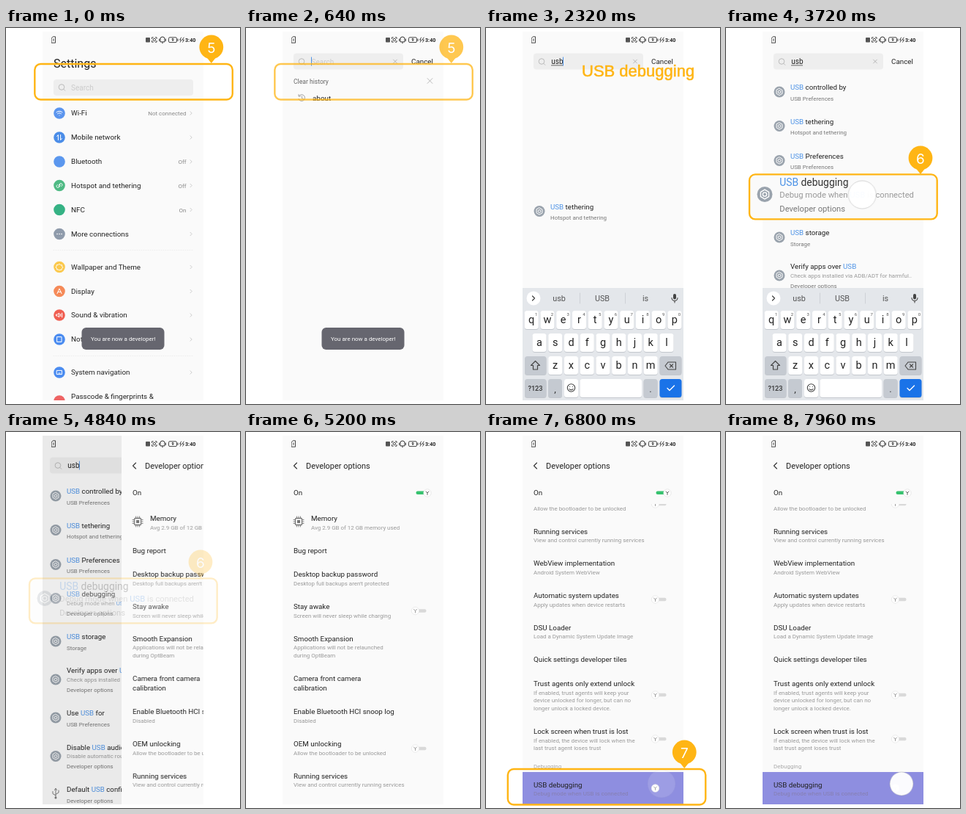
An HTML page for the animation above (8000 ms loop, 320 by 512 pixels).

```html
<!DOCTYPE html>
<html lang="en">
<head>
<meta charset="utf-8">
<title>Turn on USB debugging</title>
<style>
html, body { margin: 0; width: 100%; height: 100%; overflow: hidden; background: #fff; }
svg { display: block; width: 320px; height: 512px; font-family: Roboto, "Noto Sans", sans-serif; }
text { white-space: pre; }
.line { fill: none; stroke-linecap: round; stroke-linejoin: round; }
</style>
</head>
<body>
<svg id="stage" viewBox="0 0 320 512"></svg>
<script>
const LOOP = 8000;
const INK = '#222', GREY = '#999', BLUE = '#4c92e6', GOLD = '#ffb514';
const SLIDE = 'cubic-bezier(.2,.3,.4,1)';
let css = '';

// Adds a looping animation for the class `name` from [ms, value] pairs.
function anim(name, prop, points, ease = 'linear') {
  const steps = points.map(([ms, v]) => `${(ms / LOOP * 100).toFixed(4)}%{${prop}:${v}}`).join('');
  const last = points[points.length - 1][1];
  css += `@keyframes ${name}{${steps}100%{${prop}:${last}}}` +
    `.${name}{animation:${name} ${LOOP}ms ${ease} infinite}`;
}
// Fades in over inA..inB and out over outA..outB; equal times make a cut.
function fade(name, inA, inB, outA, outB) {
  const p = inB > 0 ? [[0, 0], [inA - .1, 0], [inB, 1]] : [[0, 1]];
  if (outA) p.push([outA, 1], [outB === outA ? outB + .1 : outB, 0]);
  anim(name, 'opacity', p);
}
const shiftX = v => `translateX(${v}px)`;
const shiftY = v => `translateY(${v}px)`;

// y is the middle of the capital letters
const text = (x, y, size, str, fill = INK, more = '') =>
  `<text x="${x}" y="${y + size * .355}" font-size="${size}" fill="${fill}" ${more}>${str}</text>`;
const mid = 'text-anchor="middle"';
const rect = (x, y, w, h, fill, r = 0, more = '') =>
  `<rect x="${x}" y="${y}" width="${w}" height="${h}" rx="${r}" fill="${fill}" ${more}/>`;
const disc = (x, y, r, fill, more = '') => `<circle cx="${x}" cy="${y}" r="${r}" fill="${fill}" ${more}/>`;
const line = (d, stroke = '#333', w = 1, more = '') =>
  `<path class="line" d="${d}" stroke="${stroke}" stroke-width="${w}" ${more}/>`;
const group = (name, body) => `<g class="${name}">${body}</g>`;
const at = (x, y, body) => `<g transform="translate(${x} ${y})">${body}</g>`;
const tint = s => s.replace('USB', `<tspan fill="${BLUE}">USB</tspan>`);
const cross = (x, y, r) => line(`M${x - r} ${y - r}l${2 * r} ${2 * r}m0 ${-2 * r}l${-2 * r} ${2 * r}`, '#aaa', .8);
const page = fill => rect(50, 5, 220, 502, fill);

function magnifier(y) {
  return disc(76, y - .5, 3.8, 'none', 'stroke="#b5b5b5" stroke-width=".9"') +
    line(`M79 ${y + 2.5}l1.8 1.8`, '#b5b5b5', .9);
}

function statusBar() {
  return line('M62.5 13.5l1.8-1.7h3.2v8.4h-5z', '#333', .9) + line('M65 15v2.3', '#333', 1) +
    rect(191, 13, 6, 6.5, '#555', 1) +
    line('M199.5 14.5v-1.7h1.8m3 0h1.8v1.7m0 3v1.7h-1.8m-3 0h-1.8v-1.7', '#333', .9) +
    disc(202.8, 16, 1.7, 'none', 'stroke="#333" stroke-width=".9"') +
    line('M211 18.5v-3.5a3 3 0 0 1 6 0v3.5zm2.4 1.7h1.2M209.7 15v2.5m8.6-2.5v2.5', '#333', 1) +
    rect(222.5, 12.8, 11, 6.8, 'none', 1.5, 'stroke="#333" stroke-width=".9"') +
    line('M235 15v2.5') + text(228, 16.2, 5.5, '9', '#222', mid + ' font-weight="700"') +
    line('M239.6 13l-2 3.2h2.3l-1.7 3m4.9-6.2l-2 3.2h2.3l-1.7 3', '#333', .9) +
    text(245, 16.2, 7.2, '3:40', '#222', 'font-weight="700"');
}

// ---- Settings page ----
const GLYPHS = {
  wifi: 'M-4-1.2a5.6 5.6 0 0 1 8 0M-2.6.8a3.6 3.6 0 0 1 5.2 0M0 3v.1',
  data: 'M-1.6 3.5v-7l-1.8 2M1.6-3.5v7l1.8-2',
  link: 'M-.5 1.5a2 2 0 0 1 0-2.6l1.6-1.5a1.9 1.9 0 0 1 2.6 2.6l-1 1M.5-1.5a2 2 0 0 1 0 2.6l-1.6 1.5a1.9 1.9 0 0 1-2.6-2.6l1-1',
  dots: 'M-3 0h.1M0 0h.1M3 0h.1',
  flower: 'M0-4l1.5 1.2 2 .1.2 2 1.1 1.4-1.5 1.3-.4 1.8-2 .1L0 4.5l-1.3-.9-2-.1-.3-1.8-1.4-1.2 1-1.5.3-1.8 2-.2z',
  letter: 'M-3 3.2L0-3.6 3 3.2M-1.8 1h3.6',
  sound: 'M-4-1h1.6l2-2v6l-2-2H-4zM1.6-1.6v3.2M3.6-2.8v5.6',
  frame: 'M-3-3.4h6v6.8h-6z',
  nav: 'M-3.4-2.6h6.8v5.2h-6.8zM-1.2 1h2.4'
};
const SETTINGS = [
  [116, 'Wi-Fi', '#5b95ee', 'wifi', 'Not connected'],
  [149, 'Mobile network', '#4b8de8', 'data', ''],
  [182, 'Bluetooth', '#5b97ee', '', 'Off'],
  [214.5, 'Hotspot and tethering', '#4fba84', 'link', 'Off'],
  [247.5, 'NFC', '#35b284', '', 'On'],
  [280.5, 'More connections', '#8f9bab', 'dots', ''],
  [325.5, 'Wallpaper and Theme', '#fbc94e', 'flower', ''],
  [358.5, 'Display', '#f58a58', 'letter', ''],
  [391, 'Sound &amp; vibration', '#f05f52', 'sound', ''],
  [424, 'Notification center', '#4b8cf0', 'frame', ''],
  [469, 'System navigation', '#4b8cf0', 'nav', '']
];
function settingsPage() {
  const rows = SETTINGS.map(([y, name, color, glyph, value]) =>
    disc(73, y, 7.8, color) +
    (glyph ? at(73, y, line(GLYPHS[glyph], '#fff', glyph === 'dots' ? 1.6 : 1)) : '') +
    text(89, y, 9.85, name) +
    text(246.5, y + .3, 8, value, '#888', 'text-anchor="end"') +
    line(`M252 ${y - 2.2}l2.2 2.2-2.2 2.2`, '#c0c0c0', .8)).join('');
  const rule = y => line(`M65 ${y}H256`, '#e9e9e9', .7, 'stroke-dasharray="1 2"');
  return page('#fafafa') + text(65, 48, 16, 'Settings') +
    rect(65, 70, 191, 22, '#eee', 4) + magnifier(81) + text(89, 81.3, 10, 'Search', '#ccc') +
    rows + rule(302.5) + rule(446.5) +
    text(89, 502, 9.85, 'Passcode &amp; fingerprints &amp;') + disc(73, 508, 7.8, '#ee6464');
}

// ---- Search page ----
const gear = (x, y, k = 1) => `<g transform="translate(${x} ${y}) scale(${k})">` +
  disc(0, 0, 7.5, '#9aa3ad') + line('M0-4.6l4 2.3v4.6l-4 2.3-4-2.3v-4.6z', '#fff', 1) +
  disc(0, 0, 1.9, 'none', 'stroke="#fff" stroke-width="1"') + '</g>';
const trident = line('M73 485.5v12m0-12l-1.5 2m1.5-2l1.5 2M73 495l-4-2.5v-3M73 493.5l4-2.5v-3', '#777') +
  disc(73, 498, 1.5, '#777');
function result(y, title, subs, icon) {
  const three = subs.length > 1;
  return (icon || gear(73, y + (three ? (title[0] === 'U' ? 5.5 : 12) : 6))) +
    text(88, y, 9.75, tint(title)) +
    subs.map((s, i) => three && !i
      ? text(88, y + 12, 7.95, tint(s), GREY)
      : text(88, y + (three ? 26 : 15), 7.95, s, '#777')).join('');
}
const DEV = 'Developer options', PREF = 'USB Preferences';
const RESULTS = [
  [81, 'USB controlled by', [PREF]],
  [174.5, PREF, [PREF]],
  [221, 'USB debugging', ['Debug mode when USB is connected', DEV]],
  [279, 'USB storage', ['Storage']],
  [325, 'Verify apps over USB', ['Check apps installed via ADB/ADT for harmful..', DEV]],
  [383, 'Use USB for', [PREF]],
  [429.5, 'Disable USB audio routing', ['Disable automatic routing to USB audio', DEV]],
  [487, 'Default USB configuration', [DEV], trident]
];
const caret = x => group('caret', rect(x, 39.5, 1, 12, BLUE));
const typed = (name, str, end, more = '') => group(name, text(89.3, 45.5, 10, str) + caret(end) + more);
function searchPage() {
  return page('#fafafa') +
    group('results', RESULTS.map(r => result(...r)).join('')) +
    group('tether', group('tetherIn', result(127.5, 'USB tethering', ['Hotspot and tethering']))) +
    rect(65, 34.5, 150, 22, '#eee', 4) + magnifier(46) + cross(204, 45.5, 2.4) +
    text(226, 46, 9.85, 'Cancel') +
    group('history', text(89.5, 46, 10, 'Search', '#ccc') + caret(89) +
      text(65, 72.5, 8.6, 'Clear history', '#666') + cross(251.5, 72, 3.4) +
      line('M72.5 92.5a4.4 4.4 0 1 1-.6 4M72 90.5v2.5h2.5M76.5 93v2.8l2 1', '#999', .9) +
      text(91, 95.5, 9.85, 'about')) +
    typed('typeU', 'u', 95) + typed('typeUs', 'us', 100) +
    typed('typeUsb', 'usb', 105, group('underline', rect(89, 50.5, 16, .8, '#444')));
}

// ---- Keyboard ----
function keyboard() {
  const cap = (x, y, w, fill = '#fff') => rect(x, y + 1, w, 25, '#c3c7cd', 3.5) + rect(x, y, w, 25, fill, 3.5);
  const letters = (str, x, y) => [...str].map((c, i) => {
    const cx = x + i * 21.75;
    return cap(cx - 9.5, y, 19) + text(cx, y + 11.7, 14.5, c, INK, mid) +
      (y < 400 ? text(cx + 6.5, y + 4.5, 6, (i + 1) % 10, '#555', mid) : '');
  }).join('');
  const dark = '#c5cad1';
  return rect(50, 354, 220, 153, '#e4e7eb') + disc(65, 368, 9.5, '#fff') +
    line('M63.5 365l3 3-3 3', '#444', 1.3) +
    group('hints', text(100, 368.5, 10.8, 'usb', '#555', mid) + text(159, 368.5, 10.8, 'USB', '#555', mid) +
      text(218, 368.5, 10.8, 'is', '#555', mid) + line('M128.5 361v14M190.5 361v14', '#c8ccd1', .8)) +
    rect(256, 362, 4, 7.5, '#444', 2) + line('M254 367.5a4 4 0 0 0 8 0M258 371.5v2.5', '#444', 1.1) +
    letters('qwertyuiop', 62.2, 385) + letters('asdfghjkl', 73, 416) + letters('zxcvbnm', 94.7, 447) +
    cap(53, 447, 29.5, dark) + line('M67.5 453.5l6 6h-3v5.5h-6v-5.5h-3z', '#444', 1.2) +
    cap(237.5, 447, 30, dark) + line('M249 455h10.5v10H249l-4-5zm2.5 3l4 4m0-4l-4 4', '#444', 1.1) +
    cap(53, 478, 29.5, dark) + text(67.5, 490.5, 9.2, '?123', '#333', mid + ' font-weight="500"') +
    cap(85, 478, 19, dark) + text(94.5, 491, 13, ',', '#333', mid) +
    cap(107, 478, 19) + disc(116.5, 490, 5.2, 'none', 'stroke="#444" stroke-width="1.1"') +
    line('M114.5 488.5h.1m3.8 0h.1M114 491.5a3 3 0 0 0 5 0', '#444', 1.1) +
    cap(128.5, 478, 84.5) + cap(215.5, 478, 19, dark) + text(225, 491, 13, '.', '#333', mid) +
    cap(237.5, 478, 30, '#1a73e8') + line('M248 490.5l3 3 6.5-6.5', '#fff', 1.4);
}

// ---- Developer options page ----
const knob = (x, y, mark = '#999') => disc(x, y, 5.2, '#fff', 'stroke="#e2e2e2" stroke-width=".7"') +
  line(`M${x - 2} ${y - 2}l2 2 2-2m-2 2v2.5`, mark, 1);
const toggle = y => rect(233, y - 2.2, 13.5, 4.4, '#d9d9d9', 2) + knob(231.5, y);
const OPTIONS = [
  [118, 'Memory', ['Avg 2.9 GB of 12 GB memory used'], 0, 89],
  [161.5, 'Bug report', []],
  [194, 'Desktop backup password', ['Desktop full backups aren\'t protected']],
  [238, 'Stay awake', ['Screen will never sleep while charging'], 243.5],
  [281.5, 'Smooth Expansion', ['Applications will not be relaunched', 'during OptBeam']],
  [381, 'Enable Bluetooth HCI snoop log', ['Disabled']],
  [425, 'OEM unlocking', ['Allow the bootloader to be unlocked'], 431],
  [468.5, 'Running services', ['View and control currently running services']],
  [512, 'WebView implementation', ['Android System WebView']],
  [556, 'Automatic system updates', ['Apply updates when device restarts'], 561],
  [599.5, 'DSU Loader', ['Load a Dynamic System Update Image']],
  [643, 'Quick settings developer tiles', []],
  [676, 'Trust agents only extend unlock',
    ['If enabled, trust agents will keep your', 'device unlocked for longer, but can no', 'longer unlock a locked device.'], 691],
  [741, 'Lock screen when trust is lost',
    ['If enabled, the device will lock when the', 'last trust agent loses trust'], 751]
];
function devPage() {
  const rows = OPTIONS.map(([y, title, subs, sw, x = 65]) =>
    text(x, y, 9.8, title) +
    subs.map((s, i) => text(x, y + 12 + i * 10.5, 7.95, s, GREY)).join('') +
    (sw ? toggle(sw) : '')).join('');
  const pins = [0, 90, 180, 270].map(a =>
    `<g transform="rotate(${a})">${line('M-2.5-5v-2M0-5v-2M2.5-5v-2', '#777', .9)}</g>`).join('');
  const chip = at(72, 122, rect(-4.5, -4.5, 9, 9, 'none', 1, 'stroke="#777" stroke-width="1.3"') +
    rect(-2, -2, 4, 4, '#777') + pins);
  const list = chip + rows + text(65, 335.5, 9.8, 'Camera front camera') + text(65, 349, 9.8, 'calibration') +
    text(65, 788, 8, 'Debugging', '#aaa') +
    rect(50, 796, 220, 44, '#fafafa', 0, 'class="glow"') + text(65, 813.5, 9.8, 'USB debugging') +
    text(65, 825.5, 7.95, 'Debug mode when USB is connected', GREY, 'class="dimText"') + knob(231.5, 818);
  return page('#fafafa') + `<g clip-path="url(#list)">${group('scroll', list)}</g>` +
    line('M69.5 42l-4 4 4 4', '#333', 1.1) + text(82, 46, 10.95, DEV) + text(65, 83, 9.8, 'On') +
    rect(232.5, 80.5, 14, 4.6, '#36c26e', 2.3) + knob(248, 83, '#666');
}

// ---- Overlays ----
const pin = (x, y, n) => disc(x, y, 16.4, GOLD) +
  `<path d="M${x - 6} ${y + 14.5}h12l-6 7.5z" fill="${GOLD}"/>` +
  text(x, y + .8, 19, n, '#fff', mid + ' font-family="Inter, Lato, sans-serif"');
const box = (x, y, w, h, fill = 'none') => rect(x, y, w, h, fill, 8, `stroke="${GOLD}" stroke-width="2.4"`);
const wide = (x, y, n) => box(x, y, 270.5, 48.5) + pin(x + 241.5, y - 23, n);
const zoomed = box(32, 199.4, 256.7, 61, '#fafafa') + pin(266, 177, 6) + gear(53, 226.5, 1.4) +
  text(73.3, 210.2, 13.85, tint('USB debugging'), '#333') +
  text(73.3, 227.2, 11.25, tint('Debug mode when USB is connected'), GREY) + text(73.3, 246.2, 11.2, DEV, '#777');
const tap = (n, x, y) => at(x, y, group('tap' + n, group('pulse' + n,
  disc(0, 0, 19, '#fff', 'fill-opacity=".97" stroke="#aaa" stroke-width=".6" stroke-opacity=".8"'))));

// ---- Timing ----
anim('settings', 'transform', [[0, shiftX(0)], [280, shiftX(0)], [620, shiftX(-10)]], SLIDE);
anim('search', 'transform', [[0, shiftX(220)], [280, shiftX(220)], [620, shiftX(0)], [4700, shiftX(0)], [5200, shiftX(-10)]], SLIDE);
anim('dev', 'transform', [[0, shiftX(220)], [4700, shiftX(220)], [5200, shiftX(0)]], SLIDE);
anim('shadeA', 'opacity', [[0, 0], [280, 0], [620, .12]], SLIDE);
anim('shadeB', 'opacity', [[0, 0], [4700, 0], [5200, .12]], SLIDE);
anim('keys', 'transform', [[0, shiftY(160)], [640, shiftY(160)], [760, shiftY(0)], [4560, shiftY(0)], [4700, shiftY(160)]], 'ease-out');
anim('tether', 'transform', [[0, shiftY(116)], [2320, shiftY(116)], [2560, shiftY(0)]], 'ease-in-out');
anim('scroll', 'transform', [[0, shiftY(0)], [5340, shiftY(0)], [5540, shiftY(-333)]], 'ease-out');
anim('glow', 'fill', [[0, '#fafafa'], [5540, '#fafafa'], [5640, '#d6d6e2'], [5800, '#8e8ee0']]);
anim('dimText', 'fill', [[0, GREY], [5640, GREY], [5800, '#867fb0']]);
anim('caret', 'opacity', [[0, 1], [919.9, 1], [920, 0], [1079.9, 0], [1080, 1], [2700, 1], [2700.1, 0], [4559.9, 0], [4560, 1]]);
fade('history', 0, 0, 1080, 1080);
fade('typeU', 1080, 1080, 1640, 1640);
fade('typeUs', 1640, 1640, 2160, 2160);
fade('typeUsb', 2160, 2160);
fade('underline', 2160, 2160, 4560, 4560);
fade('hints', 2160, 2160);
fade('tetherIn', 2200, 2280);
fade('results', 2560, 2700);
fade('toast', 0, 0, 680, 760);
fade('caption', 1080, 1280, 2720, 2920);
fade('call5', 0, 0, 600, 760);
fade('call6', 3200, 3480, 4720, 4880);
fade('call7', 6080, 6360, 7640, 7960);
fade('tap6', 3480, 3640, 4560, 4720);
fade('tap7', 6780, 6940);
// Touch dots breathe with a 640 ms period, widest 200 ms after they appear.
for (const [n, start] of [[6, 3520], [7, 6800]]) {
  const p = [[0, 'scale(1)']];
  for (let ms = start + 200, i = 0; ms < LOOP; ms += 320, i++) p.push([ms, `scale(${i % 2 ? .84 : 1})`]);
  anim('pulse' + n, 'transform', p, 'ease-in-out');
}

document.head.insertAdjacentHTML('beforeend', `<style>${css}</style>`);
document.getElementById('stage').innerHTML =
  '<defs><clipPath id="phone"><rect x="50" y="5" width="220" height="502"/></clipPath>' +
  '<clipPath id="list"><rect x="50" y="98" width="220" height="409"/></clipPath></defs>' +
  '<g clip-path="url(#phone)">' +
  group('settings', settingsPage()) + group('shadeA', page('#000')) +
  group('search', searchPage()) + group('keys', keyboard()) + group('shadeB', page('#000')) +
  group('dev', devPage()) + statusBar() +
  group('toast', rect(103.5, 408, 113, 30, '#66666f', 6) + text(160.3, 423.5, 7.98, 'You are now a developer!', '#fff', mid)) +
  '</g>' +
  group('caption', text(131, 58, 22, 'USB debugging', GOLD,
    `font-family="Liberation Sans, Arial, sans-serif" stroke="${GOLD}" stroke-width=".6"`)) +
  group('call5', wide(39.3, 49, 5)) + group('call6', zoomed) + group('call7', wide(29.8, 459, 7)) +
  tap(6, 186.3, 227) + tap(7, 240, 479);
</script>
</body>
</html>
```
